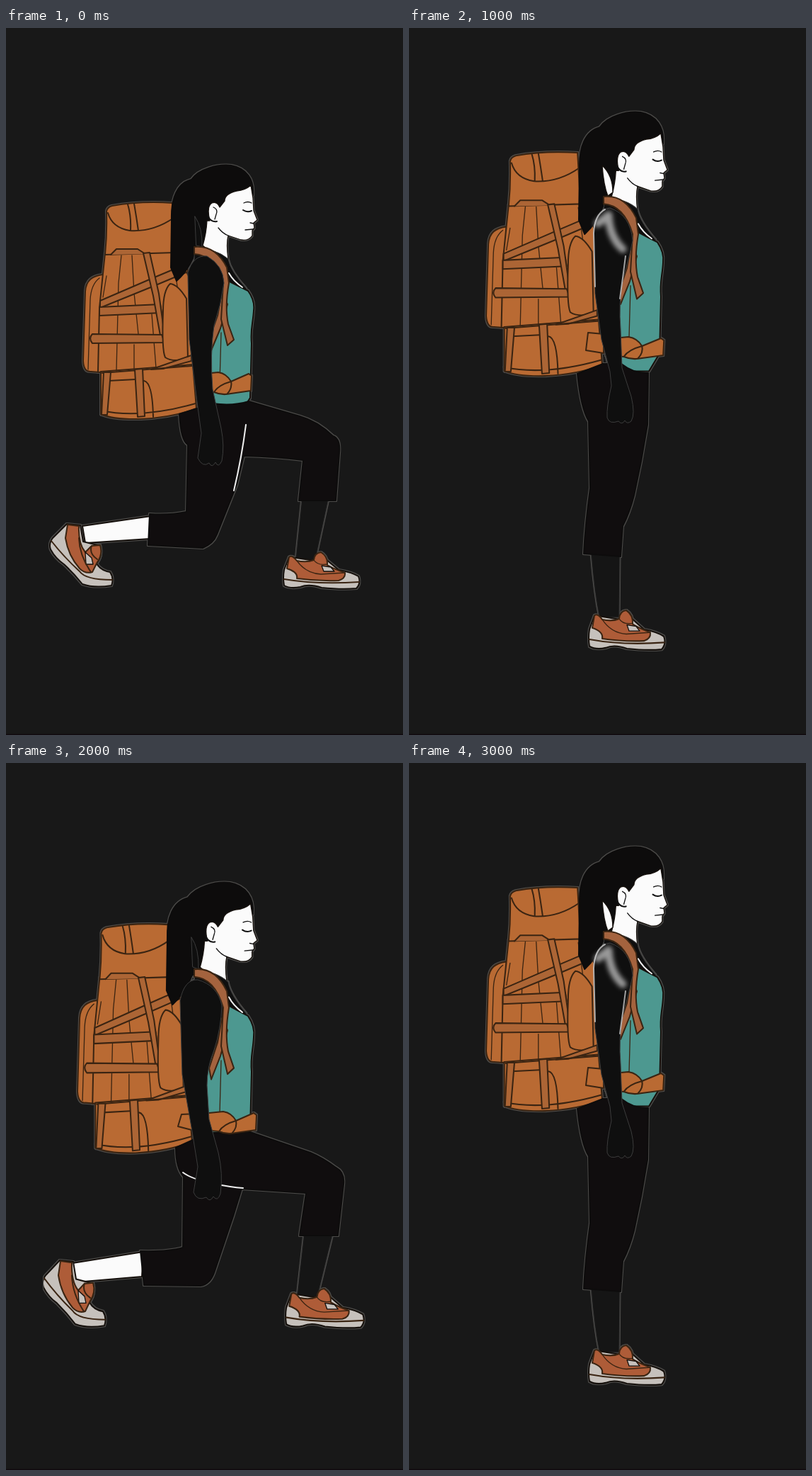
An HTML page that plays this animation: 561x998 px, repeating every 4 s.

```html
<!DOCTYPE html>
<html lang="en">
<head>
<meta charset="utf-8">
<title>Backpack lunges</title>
<style>
html, body { margin: 0; width: 100%; height: 100%; overflow: hidden; background: #181818; }
svg { display: block; width: 100%; height: 100%; }
path { stroke: #15100c; stroke-width: 2; stroke-linejoin: round; stroke-linecap: round; }
.pack { fill: #b96a33; }
.band { fill: #ac6535; }
.strap { fill: #a4633e; }
.shoe { fill: #ae5c38; }
.pack, .pack path, .strap, .shoe, .line { stroke: #3a2412; }
.line { fill: none; }
.thin { stroke-width: 1.3; }
.ink { fill: none; stroke: #111; }
.shirt { fill: #4d9890; }
.hair { fill: #0d0c0c; stroke: #0d0c0c; }
.pants { fill: #100d0e; stroke: #0d0c0c; }
.skin { fill: #0f0f0f; stroke: #3c3c3c; stroke-width: 1; }
.calf { fill: #151515; stroke: #333; stroke-width: 1; }
.white { fill: #fbfbfb; }
.sole { fill: #c6c1bc; }
.glint { fill: none; stroke: #eee; }
.glow { fill: none; stroke: #999; stroke-width: 11; }
</style>
</head>
<body>
<svg viewBox="0 0 561 998" preserveAspectRatio="none">
<defs>
  <filter id="rim" filterUnits="userSpaceOnUse" x="0" y="0" width="561" height="998" color-interpolation-filters="sRGB">
    <feMorphology in="SourceAlpha" operator="dilate" radius="1" result="wide"/>
    <feFlood flood-color="#4c4b49"/>
    <feComposite in2="wide" operator="in"/>
    <feMerge><feMergeNode/><feMergeNode in="SourceGraphic"/></feMerge>
    <feGaussianBlur stdDeviation=".5"/>
  </filter>
  <filter id="soft" x="-50%" y="-50%" width="200%" height="200%"><feGaussianBlur stdDeviation="3"/></filter>
  <clipPath id="edge"><path d="M53,0H561V998H53Z"/></clipPath>

  <g id="pack" class="pack">
    <path d="M137,348C122,350 113,356 112,372L109,470Q110,486 120,485L133,486Z"/>
    <path class="line thin" d="M132,353Q120,362 119,384L116,482"/>
    <path d="M140,318L132,395 130,486 264,476 258,350 240,316Z"/>
    <path d="M134,485V545Q152,553 190,552Q235,550 269,537L264,475Z"/>
    <path d="M142,259Q143,253 150,251Q190,244 235,247L239,317 140,320Q143,290 142,259Z"/>
    <path class="line" d="M144,261Q150,282 175,286Q208,288 237,268M172,249Q177,265 176,285M181,248Q184,265 187,286"/>
    <path class="band" d="M148,320L156,312H186L197,319"/>
    <path class="line thin" d="M163,321L159,360 156,484M178,321L181,374 187,432M142,350L137,380M206,404L212,480M181,447V484M236,322L247,400"/>
    <path class="band" d="M133,385L205,354 255,333 257,344 207,365 133,395Z"/>
    <path class="band" d="M132,394L218,390 220,402 132,406Z"/>
    <path class="band" d="M194,318L203,317 216,375 224,433 218,434 208,378Z"/>
    <path class="band" d="M122,432L220,433 224,444 122,445Q116,438 122,432Z"/>
    <path d="M232,361Q243,362 255,382L257,467Q235,472 225,465Q220,455 222,400Q222,370 232,361Z"/>
    <path class="band" d="M205,482L262,462V470L222,481Z"/>
    <path class="line" d="M134,540Q190,552 268,530M145,498L183,496M195,498Q207,500 208,549M136,487L263,477"/>
    <path class="band" d="M182,482L193,481 196,548 186,549Z"/>
    <path class="band" d="M138,486H148L143,546H135Z"/>
  </g>

  <g id="head">
    <path class="hair" d="M262,214C272,199 299,192 318,194C340,198 351,214 349,236L310,262 290,280 277,312 267,318Q258,342 241,357L233,338L234,270C233,240 242,219 262,214Z"/>
    <path class="white thin" d="M346,222L349,240 350,258 355,271 350,275 351,282 348,286 348,293Q343,301 332,299L314,293Q311,305 314,326L296,322 278,307Q283,290 284,272L288,272Q283,252 291,247Q298,244 302,253L309,244Q309,234 326,230Q338,229 346,222Z"/>
    <path class="ink thin" d="M293,253q7,3 4,10l-2,7M336,247q6,-3 11,0M338,285l11,-1M345,275l5,1M314,293Q306,290 300,282"/>
    <path class="ink" d="M335,257q6,4 12,1M285,264Q289,275 298,273"/>
  </g>

  <g id="torso">
    <path class="skin" d="M267,312Q295,310 314,326Q317,343 340,368L318,410 262,400Z"/>
    <path class="shirt" d="M312,356L330,365 342,371Q352,385 350,399C349,417 345,425 347,445L345,522 330,546H280V450L306,385Z"/>
    <path class="line thin" d="M304,430L302,500"/>
    <path class="glint" d="M315,346Q321,357 334,366"/>
    <path class="strap" d="M305,374L313,390 303,424 290,455 287,440 299,406Z"/>
    <path class="strap" d="M266,309Q296,306 312,338L315,360Q309,394 314,418L322,440 313,448 304,411 307,360Q295,321 266,319Z"/>
  </g>

  <g id="belt">
    <path class="pack" d="M270,489L300,486Q312,488 318,499L343,488 347,491 346,512 318,516Q305,519 294,514L270,512Z"/>
    <path class="line" d="M318,499Q320,508 313,516M294,514Q300,504 318,499"/>
  </g>

  <g id="shoe">
    <path class="sole" d="M400,747Q396,757 393,765Q391,776 393,787Q402,792 416,789Q428,784 446,790Q475,793 495,791Q502,784 498,774Q488,768 470,765L452,750 436,752 410,748Z"/>
    <path class="shoe" d="M400,747Q404,743 411,752Q425,755 435,751Q436,741 445,740Q455,746 454,758Q462,763 479,769Q480,777 470,780Q440,781 411,777Q413,768 397,763Z"/>
    <path class="line thin" d="M411,752Q424,770 445,771L478,769M435,751Q440,759 454,757"/>
    <path class="sole thin" d="M446,759L459,761 464,767 449,767Z"/>
    <path class="line" d="M393,778Q440,786 499,782"/>
  </g>

  <g id="backshoe">
    <path class="sole" d="M86,700L105,702 109,725 133,731Q137,744 128,756Q134,766 147,768Q153,777 149,787Q125,791 108,785Q96,770 82,757Q70,749 63,736Q60,728 66,720Z"/>
    <path class="shoe" d="M87,701L103,703Q102,728 112,740L121,731 133,730Q137,743 129,754L122,768Q112,771 104,763Q88,745 84,720Z"/>
    <path class="sole thin" d="M112,740L121,748 123,757 113,757Z"/>
    <path class="line" d="M64,724Q82,747 104,767Q112,779 150,779M103,720Q104,745 120,768M121,731Q117,742 129,750"/>
  </g>
</defs>

<g class="pose" filter="url(#rim)">
  <use href="#pack"/>
  <use href="#head"/>
  <path class="skin" d="M267,266Q278,282 277,309L269,307Z"/>
  <use href="#torso"/>
  <path class="white" d="M205,689L108,703 112,727 203,721Z"/>
  <use href="#backshoe"/>
  <path class="calf" d="M418,664L409,752H437L456,664Z"/>
  <use href="#shoe"/>
  <path class="pants" d="M245,545Q247,583 257,588L255,683Q230,688 203,686L201,730 278,734Q293,728 298,715L326,645 336,604Q380,605 420,610L414,667H466L471,600Q473,580 462,576Q440,555 415,548L343,527Q320,534 292,530Z"/>
  <path class="glint" d="M339,560Q333,607 322,653"/>
  <use href="#belt"/>
  <path class="skin" d="M257,345Q265,320 284,322Q307,335 308,360Q304,390 294,420Q288,460 292,510L304,565Q309,590 305,611Q300,622 296,613Q291,622 287,614Q278,621 271,607L276,572 270,528 259,440Z"/>
</g>

<g class="pose" filter="url(#rim)">
  <use href="#pack" transform="matrix(1.025 0 0 1.033 -2.7 -79.1)"/>
  <use href="#head" transform="matrix(1.025 0 0 1.055 1.2 -85.6)"/>
  <path class="white thin" d="M273,194Q288,208 288,232L281,237Q275,222 273,194Z"/>
  <use href="#torso" transform="matrix(1 0 0 1.04 9 -83.4)"/>
  <path class="calf" d="M257,740Q262,800 269,832H297L298,744Z"/>
  <use href="#shoe" transform="matrix(1 0 0 1.08 -138 22.8)"/>
  <path class="pants" d="M238,488L274,474 300,474Q318,488 338,487L337,560 328,612 318,660Q312,684 302,703L299,746 247,742Q249,700 256,650L254,555Q243,538 238,488Z"/>
  <path class="pack" d="M253,430L275,432V459L250,455Z"/>
  <use href="#belt" transform="matrix(1.07 0 0 1 -11 -50)"/>
  <path class="skin" d="M261,290Q262,257 284,254Q313,264 316,300Q311,325 302,355Q296,390 299,425L301,480 314,520Q320,545 314,555Q308,560 305,554Q301,561 296,555Q283,560 280,550Q279,535 286,505L284,485 272,440 263,375Z"/>
  <path class="glow" filter="url(#soft)" d="M267,276L282,264Q283,295 302,312"/>
  <path class="glint" stroke-opacity=".65" d="M263,365L261,290Q262,264 277,256M306,322L302,353 298,382"/>
</g>

<g class="pose" filter="url(#rim)">
  <use href="#pack" transform="matrix(1.012 0 0 1.057 -9.3 -33)"/>
  <use href="#head" transform="matrix(1.05 0 0 1.055 -17.7 -35.6)"/>
  <path class="skin" d="M262,246Q273,262 272,291L264,288Z"/>
  <use href="#torso" transform="matrix(1 0 0 1.065 0 -38)"/>
  <path class="white" d="M194,690L94,706 98,733 192,725Z"/>
  <g clip-path="url(#edge)"><use href="#backshoe" transform="matrix(1 0 0 1.06 -10 -40)"/></g>
  <path class="calf" d="M421,664L411,754H440L462,664Z"/>
  <use href="#shoe" transform="matrix(1.03 0 0 1.07 -8.7 -49.8)"/>
  <path class="pants" d="M240,543Q240,572 251,584L250,684Q230,690 190,689L195,737 275,738Q288,736 294,720L321,640 333,601 424,607 415,667H469L477,595Q479,578 466,571Q447,557 430,550L345,521 286,522Z"/>
  <path class="glint" d="M250,578Q262,587 290,593T335,600"/>
  <path class="pack" d="M248,496L270,495V520L243,513Z"/>
  <use href="#belt" transform="translate(7 6)"/>
  <path class="skin" d="M246,335Q252,305 271,306Q299,314 305,342Q304,375 294,405Q284,430 284,455L287,503 300,550Q307,580 303,608Q299,620 293,612Q288,621 283,613Q270,619 265,606L271,570 263,520 249,440Z"/>
</g>
<rect y="996.5" width="561" height="1.5" fill="#100a0e"/>
</svg>
<script>
const poses = document.querySelectorAll('.pose');
const order = [0, 1, 2, 1];

function draw(now) {
  const shown = order[Math.floor(now / 1000) % order.length];
  poses.forEach((pose, i) => pose.style.display = i === shown ? '' : 'none');
  requestAnimationFrame(draw);
}
draw(performance.now());
</script>
</body>
</html>
```
